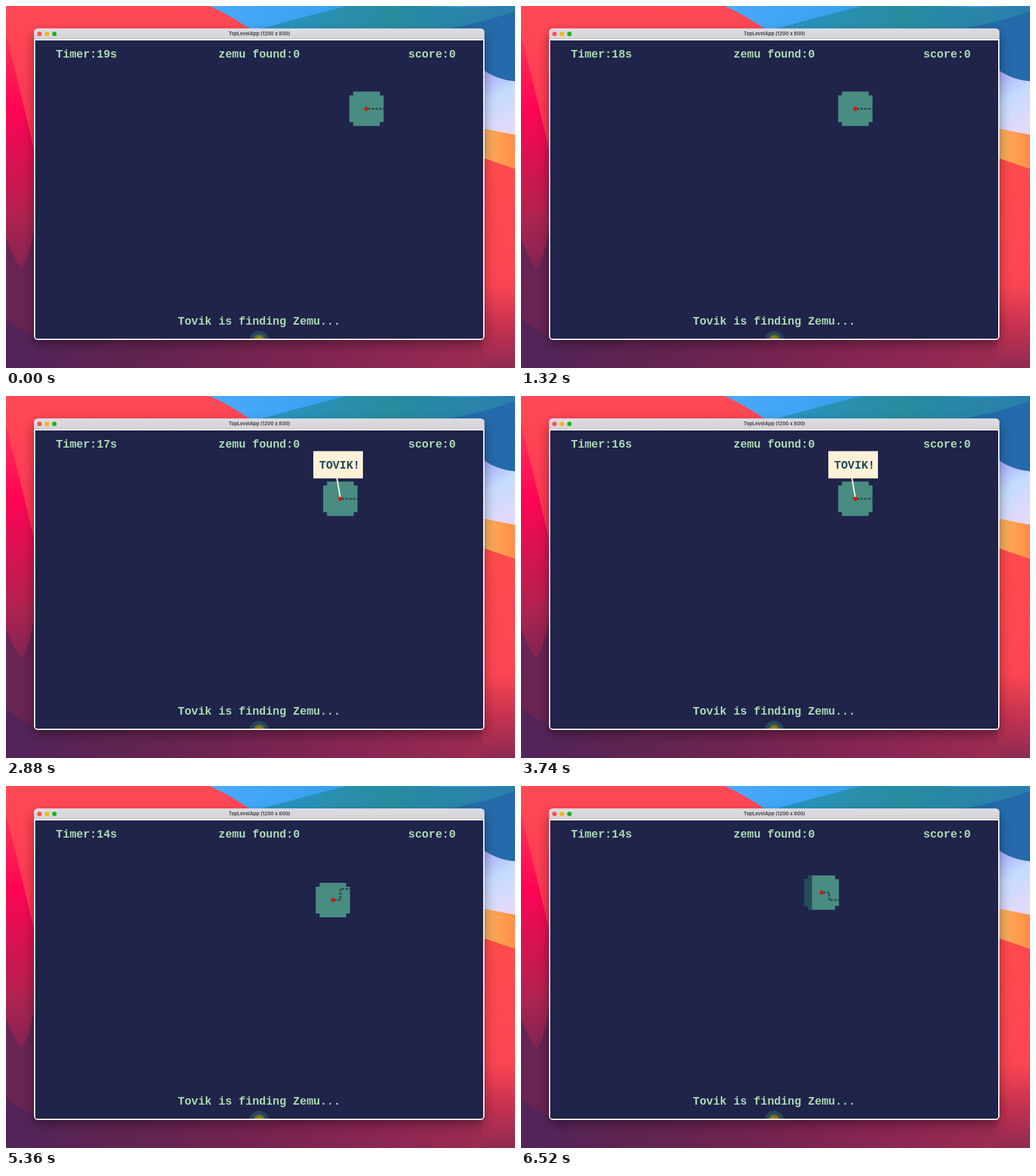
Recreate the animation shown at these times as an HTML page. Size 800 by 568 pixels, loop 6540 ms.

```html
<!DOCTYPE html>
<html lang="en">
<head>
<meta charset="utf-8">
<title>TopLevelApp</title>
<style>
  html, body { margin: 0; width: 100%; height: 100%; overflow: hidden; }
  svg { display: block; width: 100vw; height: 100vh; }
  .mono { font: bold 17.75px "Liberation Mono", "Courier New", monospace; fill: #a8dcb1; white-space: pre; }
  .title { font: 700 7.5px Inter, sans-serif; fill: #48474c; text-anchor: middle; }
</style>
</head>
<body>
<svg viewBox="0 0 800 568" preserveAspectRatio="none">
  <defs>
    <linearGradient id="base" x2="0" y2="1">
      <stop offset="0" stop-color="#ff4a55"/>
      <stop offset=".36" stop-color="#fc3553"/>
      <stop offset=".55" stop-color="#b82350"/>
      <stop offset=".75" stop-color="#7c2452"/>
      <stop offset="1" stop-color="#5c2456"/>
    </linearGradient>
    <linearGradient id="wedge" x2="0" y2="1">
      <stop offset="0" stop-color="#ff3355"/>
      <stop offset=".4" stop-color="#ff0454"/>
      <stop offset="1" stop-color="#b0224f"/>
    </linearGradient>
    <linearGradient id="floor">
      <stop offset="0" stop-color="#52245a"/>
      <stop offset=".3" stop-color="#64244f"/>
      <stop offset=".6" stop-color="#802452"/>
      <stop offset="1" stop-color="#a02c52"/>
    </linearGradient>
    <linearGradient id="sky">
      <stop offset="0" stop-color="#4ba9fb"/>
      <stop offset=".45" stop-color="#35a0ee"/>
      <stop offset="1" stop-color="#3fa4f2"/>
    </linearGradient>
    <linearGradient id="sea">
      <stop offset="0" stop-color="#2b93c4"/>
      <stop offset=".5" stop-color="#278da0"/>
      <stop offset="1" stop-color="#2a7eae"/>
    </linearGradient>
    <linearGradient id="lilac" x2=".3" y2="1">
      <stop offset="0" stop-color="#a9a4fb"/>
      <stop offset=".5" stop-color="#c3dcff"/>
      <stop offset="1" stop-color="#e2d9fa"/>
    </linearGradient>
    <linearGradient id="amber">
      <stop offset="0" stop-color="#f3b465"/>
      <stop offset=".5" stop-color="#ffa050"/>
      <stop offset="1" stop-color="#ff8d48"/>
    </linearGradient>
    <linearGradient id="coral" x2="0" y2="1">
      <stop offset="0" stop-color="#ff4a4c"/>
      <stop offset=".6" stop-color="#fb4553"/>
      <stop offset=".8" stop-color="#c6324f"/>
      <stop offset="1" stop-color="#8f2a52"/>
    </linearGradient>
    <linearGradient id="bar" x2="0" y2="1">
      <stop offset="0" stop-color="#dddce3"/>
      <stop offset="1" stop-color="#d5d3d6"/>
    </linearGradient>
    <filter id="shadow" x="-10%" y="-10%" width="120%" height="125%">
      <feGaussianBlur stdDeviation="9"/>
    </filter>
    <clipPath id="lit"><path id="litShape"/></clipPath>
    <clipPath id="view"><rect x="46" y="54" width="704" height="468"/></clipPath>
  </defs>

  <!-- wallpaper -->
  <rect width="800" height="568" fill="url(#base)"/>
  <path d="M0 45Q22 130 45 230V310Q20 340 0 330Z" fill="url(#wedge)"/>
  <path d="M0 365Q14 400 24 412Q36 400 46 340V568H0Z" fill="#682453"/>
  <path d="M0 490Q30 515 60 522H800V568H0Z" fill="url(#floor)"/>
  <path d="M320 0Q352 14 386 38H800V0Z" fill="url(#sky)"/>
  <path d="M392 38Q470 16 536 0H660Q740 4 800 -2V120H740V38Z" fill="url(#sea)"/>
  <path d="M680 38Q745 28 800 8V119Q772 116 750 100V38Z" fill="#256aaa"/>
  <path d="M748 99Q772 116 800 118V203L748 192Z" fill="url(#lilac)"/>
  <path d="M748 192L800 202V256L748 238Z" fill="url(#amber)"/>
  <path d="M748 238L800 256V568H748Z" fill="url(#coral)"/>

  <!-- window -->
  <rect x="44" y="44" width="708" height="486" rx="8" fill="#000" opacity=".38" filter="url(#shadow)"/>
  <rect x="44" y="35.5" width="708" height="488.5" rx="6" fill="#fbfbf8"/>
  <path d="M44 51.5V41.5Q44 35.5 50 35.5H746Q752 35.5 752 41.5V51.5Z" fill="url(#bar)"/>
  <path d="M44 51.5H752" stroke="#c9c5b4" stroke-width="1"/>
  <circle cx="52.6" cy="43.8" r="3.5" fill="#fa5449"/>
  <circle cx="64.4" cy="43.8" r="3.5" fill="#f6b514"/>
  <circle cx="76.1" cy="43.8" r="3.5" fill="#16b51e"/>
  <text class="title" x="398.3" y="46.3">TopLevelApp (1200 x 800)</text>
  <path d="M46 54H750V519Q750 522 747 522H49Q46 522 46 519Z" fill="#20234a"/>

  <!-- game -->
  <g clip-path="url(#view)">
    <circle cx="398" cy="525" r="15.5" fill="#26465a"/>
    <circle cx="398" cy="524.5" r="9.5" fill="#5c6238"/>
    <circle cx="398" cy="524" r="6.5" fill="#8d7d16"/>
  </g>
  <g clip-path="url(#lit)">
    <rect x="46" y="54" width="704" height="468" fill="#488c82"/>
    <rect x="46" y="54" width="411.4" height="468" fill="#264a5b"/>
    <polyline id="trail" fill="none" stroke="#264a50" stroke-width="2.8" stroke-dasharray="3.6 2.27"/>
  </g>
  <circle id="seeker" r="3.1" fill="#c5230f"/>
  <g id="bubble">
    <path d="M520 128L525.5 160" stroke="#fdf1d8" stroke-width="2.2"/>
    <rect x="483" y="86.5" width="78" height="42.8" fill="#fdf1d8"/>
    <text class="mono" x="492.3" y="114" style="fill:#21495a">TOVIK!</text>
  </g>
  <circle id="seekerTop" r="3.1" fill="#c5230f"/>
  <text class="mono" id="timer" x="78.6" y="81.3"></text>
  <text class="mono" x="334" y="81.3">zemu found:0</text>
  <text class="mono" x="632.3" y="81.3">score:0</text>
  <text class="mono" x="270" y="500.3">Tovik is finding Zemu...</text>
</svg>
<script>
const LOOP = 6540, CELL = 5.87;
const START = { x: 566.6, y: 161.3 };
const BUBBLE = [1500, 4300];
const DIRECTIONS = { L: [-1, 0], R: [1, 0], U: [0, -1], D: [0, 1] };

// Runs of key presses: first step time, interval, directions.
const runs = [
  [130, 170, 'LLLLLLL'],
  [4700, 150, 'DDDLL'],
  [5440, 125, 'LLLLLUULL'],
];
const steps = runs.flatMap(([first, gap, keys]) =>
  [...keys].map((key, i) => ({ at: first + gap * i, move: DIRECTIONS[key] })));

const el = id => document.getElementById(id);
const [litShape, trail, seeker, seekerTop, bubble, timer] =
  ['litShape', 'trail', 'seeker', 'seekerTop', 'bubble', 'timer'].map(el);

function place(node, { x, y }) {
  node.setAttribute('cx', x);
  node.setAttribute('cy', y);
}

function render(t) {
  let pos = START;
  const points = [{ x: START.x + 8 * CELL, y: START.y }, pos];
  for (const { at, move: [dx, dy] } of steps) {
    if (at > t) break;
    pos = { x: pos.x + dx * CELL, y: pos.y + dy * CELL };
    points.push(pos);
  }
  trail.setAttribute('points', points.map(p => `${p.x},${p.y}`).join(' '));
  litShape.setAttribute('d',
    `M${pos.x - 21} ${pos.y - 27}h42v6h6v42h-6v6h-42v-6h-6v-42h6z`);
  place(seeker, pos);
  place(seekerTop, pos);
  bubble.style.display = t >= BUBBLE[0] && t < BUBBLE[1] ? '' : 'none';
  timer.textContent = `Timer:${19 - Math.floor((t + 660) / 1200)}s`;
}

const origin = performance.now();
function frame() {
  render((performance.now() - origin) % LOOP);
  requestAnimationFrame(frame);
}
render(0);
requestAnimationFrame(frame);
</script>
</body>
</html>
```
